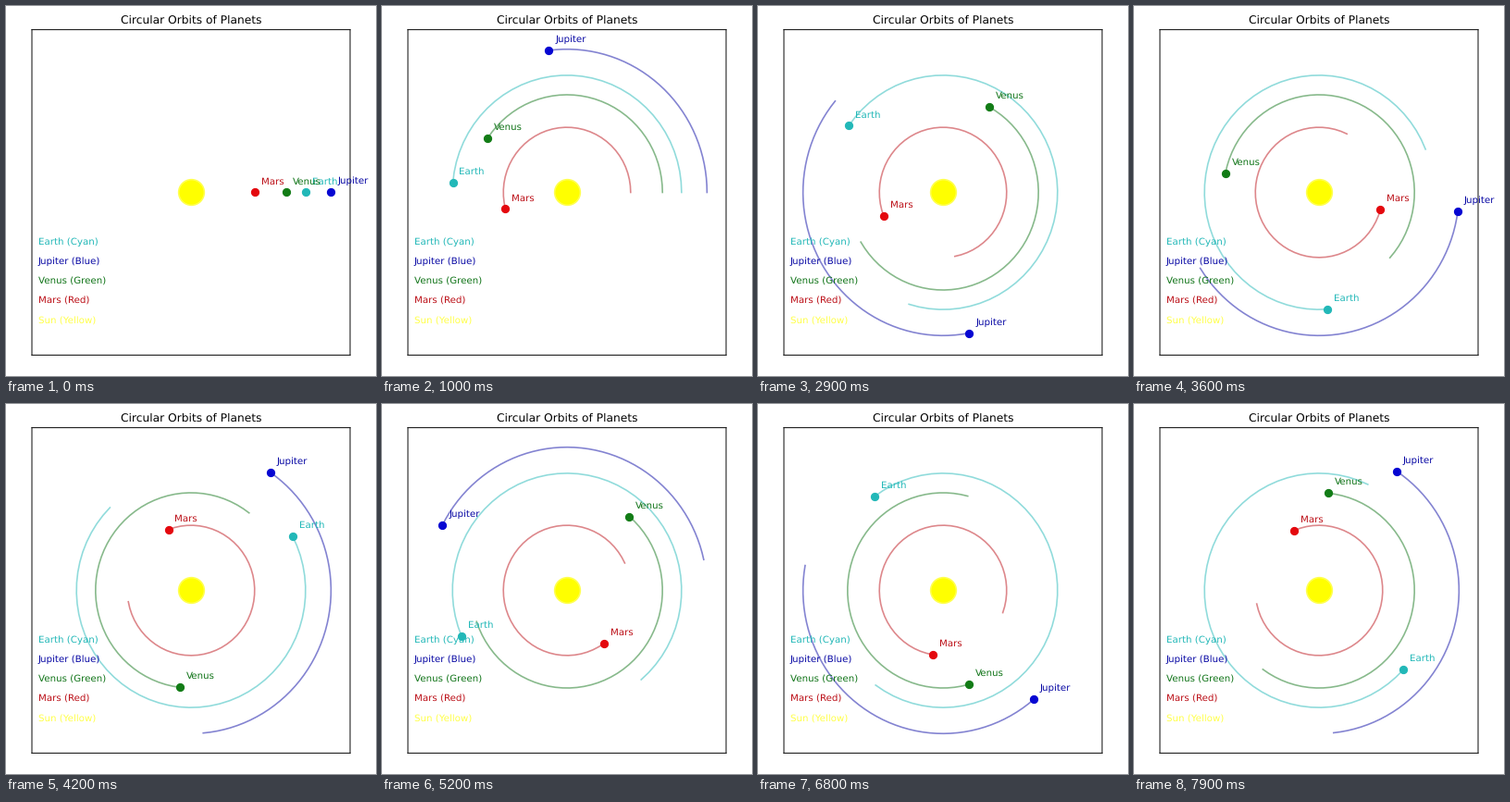
Recreate the animation shown at these times as a matplotlib script. Size 400 by 400 pixels, loop 8000 ms.

```python
import numpy as np
import matplotlib.pyplot as plt
from matplotlib.animation import FuncAnimation

FRAMES, INTERVAL = 80, 100
SIZE, DPI = 400, 100
K = 0.738  # overall scale of points on the small stage
TRAIL = 50

# name: dot colour, muted colour, colour word, radius, radians per step
PLANETS = {
    "Earth": ("#22b8b8", "#22b8b8", "Cyan", 1.8, 0.09),
    "Jupiter": ("#0606d2", "#0808a4", "Blue", 2.2, 0.05),
    "Venus": ("#127c16", "#107418", "Green", 1.5, 0.075),
    "Mars": ("#e4080e", "#bc1018", "Red", 1.0, 0.1),
}

# The simulation runs at a slightly uneven pace
PACE = ([0, 20, 29, 42, 52, 68, 79], [0, 68, 98, 145, 179, 234, 271])

plt.rcParams.update({"font.family": "DejaVu Sans", "text.hinting": "none",
                     "toolbar": "None"})

fig = plt.figure(figsize=(SIZE / DPI, SIZE / DPI), dpi=DPI, facecolor="white")
left, right, top, bottom = 28.0, 372.0, 25.6, 377.4
ax = fig.add_axes([left / SIZE, 1 - bottom / SIZE,
                   (right - left) / SIZE, (bottom - top) / SIZE])
ax.set(xlim=(-2.5, 2.5), ylim=(-2.5, 2.5), xticks=[], yticks=[])
for spine in ax.spines.values():
    spine.set(linewidth=K, color="#101010", snap=False)
ax.set_title("Circular Orbits of Planets", fontsize=12 * K, pad=6.4 * K)


def orbit(radius, angle):
    return radius * np.cos(angle), radius * np.sin(angle)


ax.plot(0, 0.01, "o", color="#ffff00", mec="#ffff50", ms=27 * K, mew=1.6 * K,
        snap=False)

bodies = []
for i, (name, (color, muted, word, radius, speed)) in enumerate(PLANETS.items()):
    trail, = ax.plot([], [], color=muted, lw=1.6 * K, alpha=0.5)
    dot, = ax.plot([], [], "o", color=color, ms=8 * K, mew=K, snap=False)
    label = ax.text(0, 0, name, color=muted, fontsize=10 * K, va="bottom")
    ax.text(-2.4, -0.8 - 0.3 * i, f"{name} ({word})", color=muted,
            fontsize=10 * K)
    bodies.append((radius, speed, trail, dot, label))
ax.text(-2.4, -2.0, "Sun (Yellow)", color="#ffff48", fontsize=10 * K)


def update(frame):
    step = int(round(np.interp(frame, *PACE)))
    steps = np.arange(max(0, step - TRAIL + 1), step + 1)
    artists = []
    for radius, speed, trail, dot, label in bodies:
        xs, ys = orbit(radius, speed * steps)
        trail.set_data(xs, ys)
        dot.set_data(xs[-1:], ys[-1:])
        label.set_position((xs[-1] + 0.1, ys[-1] + 0.1))
        artists += [trail, dot, label]
    return artists


anim = FuncAnimation(fig, update, frames=FRAMES, interval=INTERVAL,
                     repeat=True, repeat_delay=0, blit=False)
plt.show()
```
